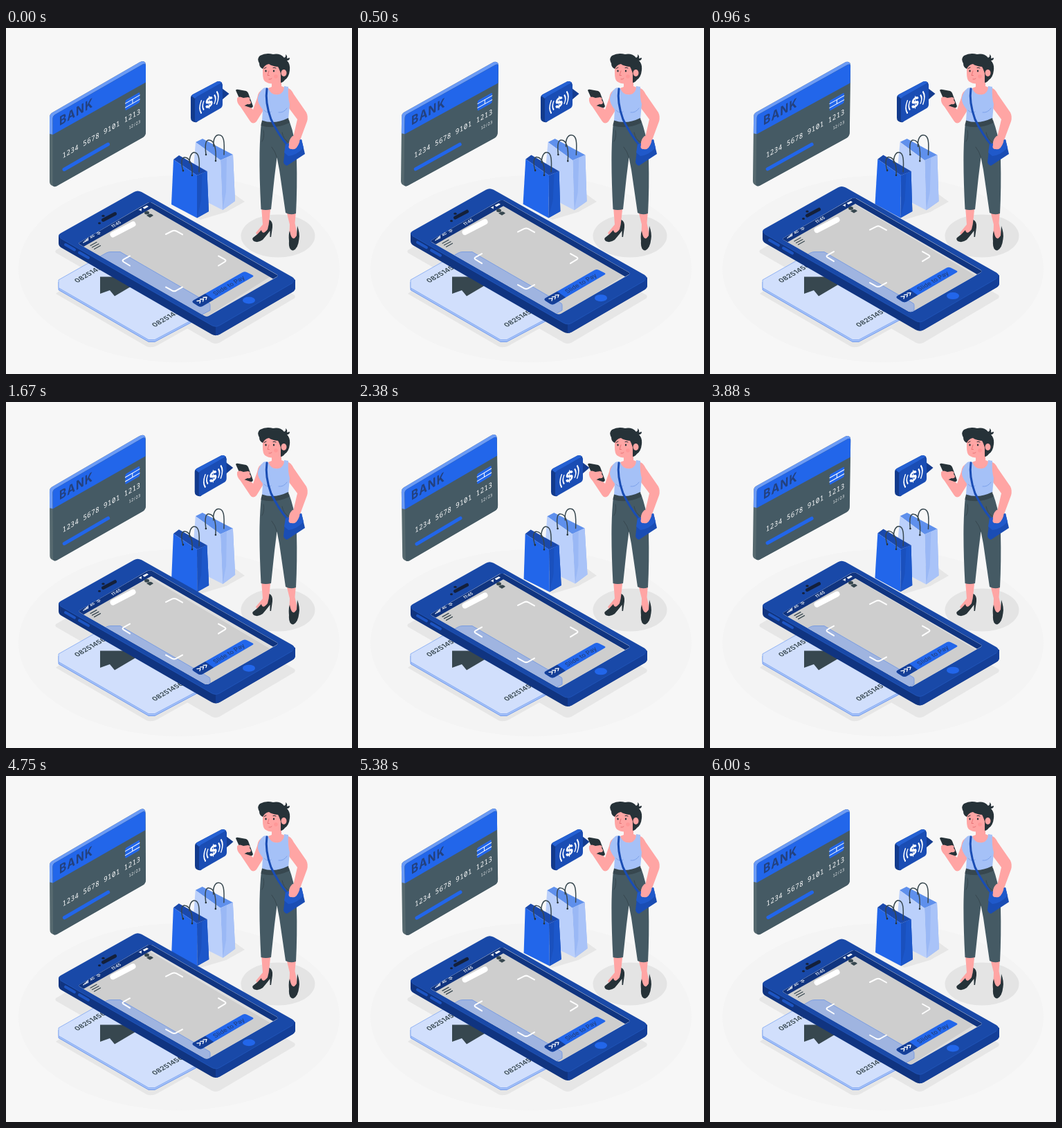
Recreate the animation shown at these times as an HTML page. Size 500x500 px, loop 6.04 s.

```html
<!DOCTYPE html>
<html lang="en">
<head>
<meta charset="utf-8">
<title>Mobile payment</title>
<style>
  html, body { margin: 0; width: 100%; height: 100%; overflow: hidden; background: #f7f7f7; }
  svg { display: block; width: 100%; height: 100%; }
  text { font-family: Inter, Roboto, sans-serif; }
  .mono { font-family: "Noto Sans Mono", "DejaVu Sans Mono", monospace; fill: #fff; }
  .line { fill: none; stroke-linecap: round; stroke-linejoin: round; }
  .skin { fill: #ffa5a4; }
  .ink { fill: #263238; }
  .blue { fill: #2266ea; }
</style>
</head>
<body>
<svg viewBox="0 0 500 500">
  <defs>
    <clipPath id="cardClip">
      <path d="M67.500 131Q67.500 127 71 125L197.500 52.500Q202 50 202 55V150Q202 155.500 198 158L73 228.500Q67.500 231 67.500 225Z"/>
    </clipPath>
    <clipPath id="hole"><path d="M107 309.500L204 253Q208 251 212 253L391 356Q394 358 391 360L294 415.500Q290 418 286 415.500L107 313Q104 311 107 309.500Z"/></clipPath>
    <path id="slip" d="M76 364L145 325Q148 323.500 151 323.500H165L294 398Q295 399 295 401V408L215 450.500H206L76 375.500Z"/>
  </defs>

  <!-- floor and shadows -->
  <ellipse cx="250" cy="348" rx="232" ry="135" fill="#f4f4f4"/>
  <ellipse cx="393" cy="300.500" rx="53.500" ry="31" fill="#e4e4e4"/>
  <path d="M298 236L327 238L345 251L318 266L281 277L262 268Z" fill="#e6e6e6"/>
  <path d="M72 321L187 255L417 386Q419 389 416 391L308 455Q303 457 298 455L74 326Q70 324 72 321Z" fill="#e6e6e6"/>
  <path d="M72 384L203 460Q210 463 218 459L300 413V402L80 378Z" fill="#e6e6e6"/>

  <g id="card">
    <path d="M63 129Q63 124.500 66.500 122.500L193 49.500Q198 46.500 201 49.500Q202 51 202 54V150Q202 155.500 198 158L73 228.500Q70 230 67 228Q63 226.500 63 222Z" fill="#56696f"/>
    <path d="M63 153V129Q63 124.500 66.500 122.500L193 49.500Q198 46.500 201 49.500Q202 51 202 54V78L68 154Z" fill="#6b9bf6"/>
    <g clip-path="url(#cardClip)">
      <path d="M60 40H210V240H60Z" fill="#455a64"/>
      <path d="M60 40H210V74L60 158.500Z" class="blue"/>
    </g>
    <text transform="matrix(.866 -.5 0 1 77 141.500)" font-size="18" font-weight="700" letter-spacing="1.200" fill="#23417f">BANK</text>
    <g transform="matrix(.866 -.5 0 1 172.500 104.500)">
      <rect width="24" height="15" rx="2" class="blue"/>
      <path class="line" d="M0 4.500H24M0 10.500H24M12 4.500V10.500" stroke="#fff" stroke-width="1.100"/>
    </g>
    <text class="mono" transform="matrix(.866 -.5 0 1 81.500 188.500)" font-size="10.400" letter-spacing=".65">1234 5678 9101 1213</text>
    <text class="mono" transform="matrix(.866 -.5 0 1 177.500 146.500)" font-size="6" letter-spacing=".3">12/23</text>
    <path class="line" d="M84 204.500L147.500 168" stroke="#2266ea" stroke-width="5"/>
  </g>

  <g id="bags">
    <path d="M274 165L284 160L328 183L310 191Z" fill="#5f90ec"/>
    <path d="M274 165L310 191L313 263L268 240Z" fill="#bbd0fb"/>
    <path d="M310 191L328 183L331 250L313 263Z" fill="#9ab8f5"/>
    <path d="M319 187L318 237L313 263L331 250L328 183Z" fill="#a9c3f8"/>
    <path class="line" d="M300 171C299 160 303 154 308 154.500C315 155 316 164 315 183M289 183C287 167 289 161 294 162C301 163 304 174 303 192" stroke="#37474f" stroke-width="1.500"/>
    <path d="M242 190L250 184L290.500 207L276 213Z" fill="#1a49ac"/>
    <path d="M242 190L276 213V274.500L239 255Z" class="blue"/>
    <path d="M276 213L290.500 207L293 265L276 274.500Z" fill="#1a50bd"/>
    <path d="M283.500 210L282 249L276 274.500L293 265L290.500 207Z" fill="#1c57ca"/>
    <path class="line" d="M265 195C265 184 269 179 273 180C279 181 280 190 279 208M256 207C252 193 254 186 259 187C266 188 270 199 269 213" stroke="#37474f" stroke-width="1.500"/>
    <g class="ink"><circle cx="256" cy="206" r="1.300"/><circle cx="269" cy="213" r="1.300"/><circle cx="289" cy="183" r="1.300"/><circle cx="303" cy="192" r="1.300"/></g>
  </g>

  <g id="bubble">
    <path d="M312 87L322.500 95L312 104Z" fill="#143c90"/>
    <path d="M267 101Q267 97.500 270 96L305 77.500Q309 76 312 79L313 83L276 136Q272 137 269 134.500Q267 133 267 130Z" fill="#123a8c"/>
    <path d="M268 98L270 96L305 77.500Q309 76 312 79L276 100L273 102Z" fill="#2561d3"/>
    <path d="M273 104Q273 101 276 99L308.500 81Q313 79 313 83V110Q313 114 310 116L277 135Q273 137 273 132.500Z" fill="#1a4db4"/>
    <g transform="matrix(.866 -.5 0 1 293.500 107.500)">
      <text y="7.300" font-size="20" font-weight="800" fill="#fff" text-anchor="middle">$</text>
      <path class="line" d="M-9 -6Q-12.500 0 -9 6M-13 -9Q-18 0 -13 9M9 -6Q12.500 0 9 6M13 -9Q18 0 13 9" stroke="#fff" stroke-width="1.900"/>
    </g>
  </g>

  <g id="woman">
    <!-- legs and shoes -->
    <path class="skin" d="M369 258H382.500L380 282L378 296L364 301L361 296L371 284Z"/>
    <path class="skin" d="M405 264H419L417.500 282L422 304L415 315L409 308L410 284Z"/>
    <path class="ink" d="M357 303Q364 298 369 292Q371 300 378 291Q380 284 380.500 277Q386 280 385 288L383 302H381.500L381.500 293Q377 299 371 306Q364 311 358 308Q355 305 357 303Z"/>
    <path class="ink" d="M409 308Q408 298 410 293Q413 311 420 300L421 286Q425 297 423.500 305Q422 319 415 321.500Q408 321 409 308Z"/>
    <path d="M369 137L409 133Q419 160 420 190Q421 230 419 268Q411 271 404 267L395 205L391.500 187L388 215L383 262Q375 264 368.500 262Q366 215 366.500 180Q367 155 369 137Z" fill="#455a64"/>
    <path class="line" d="M391.500 187Q389 178 384 172M372 148Q374 158 370 164M399 151Q401 161 408 165" stroke="#37474f" stroke-width="1"/>
    <!-- arms, neck, top -->
    <path class="skin" d="M402 84Q412 87 416 96L434 122Q437 128 435 135L425 162Q421 174 412 176Q408 174 411 169L415 158L421 132L406 112Z"/>
    <path class="skin" d="M373 88Q364 91 363 101L357 118L347 107Q340 95 334 102Q333 108 339 114L353 135Q357 140 362 135L375 114Z"/>
    <path class="skin" d="M384 70L398 70V84L408 88Q400 100 386 96L371 90L384 85Z"/>
    <path d="M372 87Q377 85 379 87Q383 98 394 96Q402 94 402 84L408 85Q407 100 410 110L408 132Q388 141 370 134L371 118Q363 108 364 101Q366 92 372 87Z" fill="#a5c1f7"/>
    <path class="line" d="M373 119Q378 124 383 121M394 122Q401 123 406 116" stroke="#7da2ea" stroke-width="1"/>
    <path d="M370 133.500Q388 140 408 130L409.500 137Q388 147 368.500 141Z" fill="#37474f"/>
    <!-- bag and strap -->
    <path class="line" d="M377 88Q374 107 383 132Q393 153 407 170" stroke="#1a4db4" stroke-width="3"/>
    <path d="M404 168L427 161L432 182L406 199Q402 198 401 194Z" fill="#1a4db4"/>
    <path d="M404 168L427 161L430 173Q420 184 408 185L402 180Z" fill="#2059ca"/>
    <path class="skin" d="M414 156Q408 162 409 169Q407 175 413 175Q420 177 424 165L425 158Z"/>
    <!-- handheld -->
    <path class="ink" d="M332 90Q333 88 336 89L347 91Q349 92 350 94L357 113Q356 116 353 115L344 112Q341 110 340 108Z"/>
    <path class="skin" d="M334 101Q337 98 343 101L350 100Q354 101 352 104L354 107Q354 111 349 110L343 113L336 109Z"/>
    <!-- head -->
    <path class="skin" d="M371 57Q374 52 381 51L396 55L399 70Q397 78 390 80Q381 82 374 77Q371 74 371 65Z"/>
    <path class="ink" d="M371 59Q366 57 366 51Q362 44 367 40Q376 35 386 38Q396 36 402 43Q405 42 404 38Q407 40 406 44L410 43Q410 47 406 47Q411 52 410 61Q409 71 403 75Q400 79 397 79L397 66Q395 59 393 56Q384 55 380 52Q374 53 371 59Z"/>
    <ellipse class="skin" cx="401.500" cy="65" rx="4" ry="5"/>
    <g class="ink"><ellipse cx="375.500" cy="62" rx="1.200" ry="1.600"/><ellipse cx="387" cy="62" rx="1.200" ry="1.600"/></g>
    <path class="line" d="M373 58.500L376 57M386 57.500Q388 56.500 390 58" stroke="#263238" stroke-width="1"/>
    <path class="line" d="M380 62L378 68.500H380.500M380 74Q382.500 74.500 384 73" stroke="#e66f72" stroke-width=".9"/>
    <circle cx="390" cy="70" r="2.800" fill="#ff8f91" opacity=".6"/>
  </g>

  <!-- slip below the phone -->
  <use href="#slip" y="3" fill="#a3c0f8" stroke="#5f8fec" stroke-width=".8"/>
  <use href="#slip" fill="#d1dffc" stroke="#7fa6f2" stroke-width=".8"/>
  <path d="M136 359.500H170L190 368L157 387.500L150 379L136 384Z" fill="#37474f"/>
  <g font-size="10" font-weight="600" fill="#37474f">
    <text transform="matrix(.866 -.5 .75 .62 103 368.500)">082514563</text>
    <text transform="matrix(.866 -.5 .75 .62 215 432.500)">082514563</text>
  </g>

  <g id="phone">
    <path d="M76 300L190 248L418 364V375Q418 379 414 381.500L309 442.500Q303 446 297 442.500L80 317.500Q76 315 76 311Z" fill="#103480"/>
    <path d="M303 431L418 364V375Q418 379 414 381.500L309 442.500Q306 444 303 444Z" fill="#143f98"/>
    <path d="M79 296.500L185 237Q190 234 196 237L414 360Q420 364 414 368.500L309 429.500Q303 433 297 429.500L79 304Q73 300 79 296.500Z" fill="#1949a8"/>
    <path class="line" d="M86 313L99 320.500M106 324.500L119 332" stroke="#1d55c2" stroke-width="4"/>
    <path class="line" d="M79 304L297 429.500Q303 433 309 429.500L414 368.500" stroke="#2358bd" stroke-width=".8"/>
    <path class="line" d="M140.500 277.500L157.500 268.500" stroke="#14203a" stroke-width="5"/>
    <ellipse cx="140.500" cy="271.500" rx="2.200" ry="1.500" fill="#14203a"/>
    <ellipse cx="135" cy="282" rx="2" ry="1.500" fill="#14203a"/>
    <ellipse cx="351" cy="393.500" rx="9" ry="5" class="blue"/>

    <g clip-path="url(#hole)">
      <path d="M90 240H400V425H90Z" fill="#dedede"/>
      <g id="below">
        <path d="M104 311L208 254L384 358L290 417Z" fill="#cecece"/>
        <use href="#slip" fill="#9fb4e0" stroke="#6e95e2" stroke-width=".8"/>
      </g>
      <path d="M104 311L208 251L394 358L386 362.500L210 260.500L112 316Z" fill="#10347f"/>
    </g>

    <!-- status bar -->
    <g fill="#fff">
      <text transform="matrix(.866 -.5 .6 .8 154 289)" font-size="6" font-weight="600">11:45</text>
      <text transform="matrix(.866 -.5 .6 .8 122.500 304.500)" font-size="5" font-weight="600">4G</text>
      <path d="M111.500 311L113 310V308.500L111.500 309.500ZM113.500 310L115 309V306.500L113.500 307.500ZM115.500 309L117 308V304.500L115.500 305.500ZM117.500 308L119 307V303L117.500 304Z"/>
      <path d="M191.500 263L196 260.500L195.500 265L194 263.500Z"/>
      <path d="M197.500 259.500L203.500 256.500L206 258L200 261.500Z"/>
    </g>
    <path class="line" d="M131 296.500Q133 294 136 295.500M132.500 298Q134 296.500 135.500 297.500" stroke="#fff" stroke-width="1"/>

    <!-- screen -->
    <path class="line" d="M122 314.500L131 309.500M124.500 317L134 312M127.500 319.500L136.500 314.500" stroke="#37474f" stroke-width="1.200"/>
    <path class="line" d="M154.500 298.500L183.500 283.500" stroke="#fff" stroke-width="8"/>
    <ellipse cx="203.500" cy="267" rx="3.500" ry="2.500" fill="#37474f"/>
    <path d="M203 271Q209 266 213 271L208 274Z" fill="#37474f"/>
    <path class="line" d="M231 298L240 293.500Q243 292 246 293.500L255 298.500M179 329.500L170 334.500Q167 336 170 338L179 343.500M231 374.500L240 379.500Q243 381 246 379.500L255 374.500M307 329.500L316 334.500Q319 336 316 338L307 343.500" stroke="#fff" stroke-width="2"/>
    <path d="M271 393.500L342 353Q345 351.500 348 353L356 357Q359 358.500 356 360L284 402Q281 403.500 278 402L271 397.500Q268 395.500 271 393.500Z" class="blue"/>
    <path d="M271 393.500L288 384L300 392.500L284 402Q281 403.500 278 402L271 397.500Q268 395.500 271 393.500Z" fill="#153f97"/>
    <path class="line" d="M276 394.500L281 394L280 397.500M280.500 392L285.500 391.500L284.500 395M285 389.500L290 389L289 392.500" stroke="#fff" stroke-width="1.300"/>
    <text transform="matrix(.866 -.5 .7 .7 302.500 387)" font-size="9" font-weight="500" fill="#23417f">Slide to Pay</text>
  </g>
</svg>
<script>
  const LOOP = 6040, END = 6000, CYCLE = 3000;

  // [time in ms, value], joined by straight lines
  const FLOAT = [[0, 0], [1500, -10], [3000, 0]];
  const SWAY = [[0, 0], [750, 1], [2250, -1], [3000, 0]];
  const SLIDE = [[0, 0], [130, -6], [880, 0], [960, 3], [1750, 6], [2380, 12], [3000, 0]];

  function valueAt(steps, t) {
    const i = Math.max(1, steps.findIndex(s => s[0] >= t));
    const [t0, a] = steps[i - 1], [t1, b] = steps[i];
    return a + (b - a) * (t - t0) / (t1 - t0);
  }

  const part = id => document.getElementById(id);
  const move = (el, x, y) => el.setAttribute("transform", `translate(${x} ${y})`);
  const turn = (el, deg, cx, cy) => el.setAttribute("transform", `rotate(${deg} ${cx} ${cy})`);
  const [card, bags, bubble, phone, below] = ["card", "bags", "bubble", "phone", "below"].map(part);

  function draw() {
    const t = Math.min(performance.now() % LOOP, END) % CYCLE;
    const lift = valueAt(FLOAT, t), sway = valueAt(SWAY, t);
    turn(card, sway, 132.5, 138.5);
    turn(bags, sway, 285, 214);
    move(bubble, valueAt(SLIDE, t), 0);
    move(phone, 0, lift);
    move(below, 0, -lift); // the floor seen through the screen stays put
    requestAnimationFrame(draw);
  }
  draw();
</script>
</body>
</html>
```
